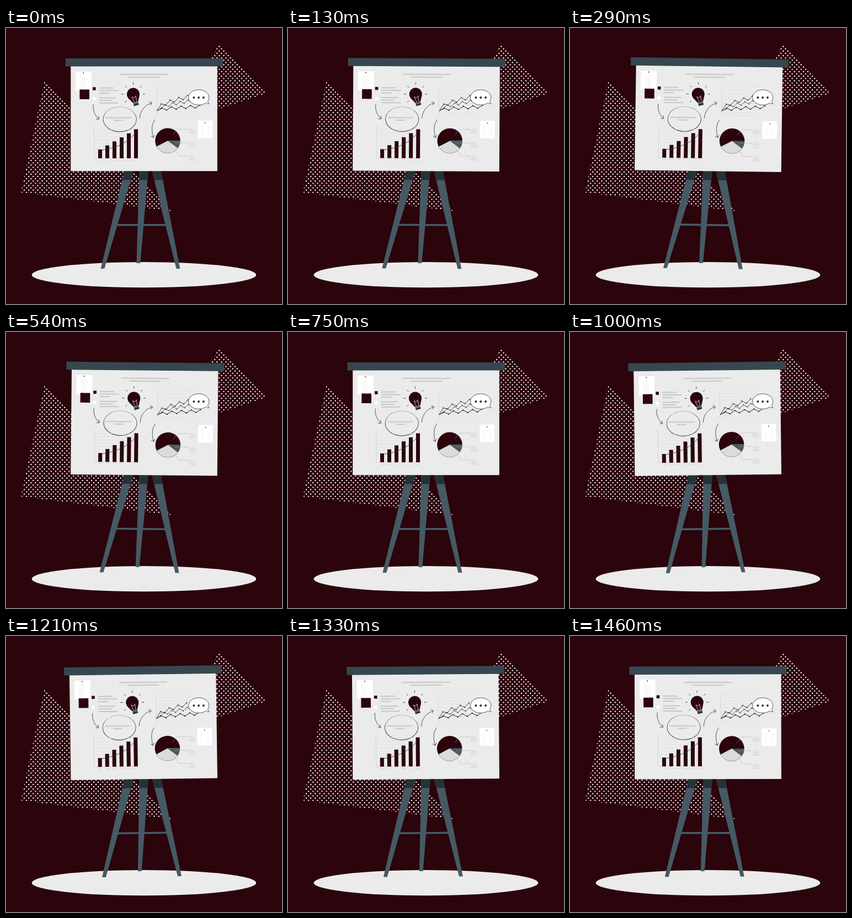
Recreate the animation shown at these times as an HTML page with a canvas. Size 500x500 px, loop 1.5 s.

```html
<!DOCTYPE html>
<html lang="en">
<head>
<meta charset="utf-8">
<title>Swaying presentation board</title>
<style>
  html, body { margin: 0; width: 100%; height: 100%; overflow: hidden; background: #2b040c; }
  canvas { display: block; width: 500px; height: 500px; }
</style>
</head>
<body>
<canvas id="stage"></canvas>
<script>
const WINE = '#2b040c', INK = '#263238', BAR = '#37474f', SLATE = '#455a64';
const PAPER = '#ebebeb', GREY = '#c7c7c7', FAINT = '#dbdbdb', WHITE = '#fff';
const TAU = Math.PI * 2, LOOP = 1500, STEPS = 36;

const canvas = document.getElementById('stage');
const ctx = canvas.getContext('2d');
const ratio = window.devicePixelRatio || 1;
canvas.width = canvas.height = 500 * ratio;

function rect(color, x, y, w, h) {
  ctx.fillStyle = color;
  ctx.fillRect(x, y, w, h);
}

function fill(color, rule = 'nonzero') {
  ctx.fillStyle = color;
  ctx.fill(rule);
}

function stroke(color, width) {
  ctx.strokeStyle = color;
  ctx.lineWidth = width;
  ctx.stroke();
}

function trace(points) {
  ctx.beginPath();
  points.forEach(([x, y]) => ctx.lineTo(x, y));
}

function poly(color, points) {
  trace(points);
  fill(color);
}

function line(color, width, points) {
  trace(points);
  stroke(color, width);
}

function ellipse(color, x, y, rx, ry = rx) {
  ctx.beginPath();
  ctx.ellipse(x, y, rx, ry, 0, 0, TAU);
  fill(color);
}

function curve(start, c1, c2, end) {
  ctx.beginPath();
  ctx.moveTo(...start);
  ctx.bezierCurveTo(...c1, ...c2, ...end);
  stroke(INK, 0.8);
}

function arrow(start, c1, c2, end) {
  curve(start, c1, c2, end);
  const [x, y] = end, back = Math.atan2(c2[1] - y, c2[0] - x);
  const barb = a => [x + 5.3 * Math.cos(back + a), y + 5.3 * Math.sin(back + a)];
  line(INK, 0.8, [barb(-0.72), end, barb(0.72)]);
}

function textLines(color, x, y, gap, height, widths) {
  widths.forEach((w, i) => rect(color, x, y + i * gap, w, height));
}

function centredLines(x, y, gap, widths) {
  widths.forEach((w, i) => rect(GREY, x - w / 2, y + i * gap, w, 2));
}

// One staggered lattice of dots shows through both triangles.
function dotField(corners) {
  const dx = 4.06, dy = 4.13;
  ctx.save();
  trace(corners);
  ctx.clip();
  ctx.beginPath();
  for (let row = 0; row < 75; row++) {
    for (let col = row % 2; col < 114; col += 2) {
      const x = 16.9 + col * dx, y = 29.4 + row * dy;
      ctx.moveTo(x + 1.2, y);
      ctx.arc(x, y, 1.2, 0, TAU);
    }
  }
  fill(WHITE);
  ctx.restore();
}

function backdrop() {
  rect(WINE, 0, 0, 500, 500);
  dotField([[70, 94], [27, 298], [303, 332]]);
  dotField([[386, 28], [473, 118], [314, 170]]);
  ellipse(PAPER, 250, 447.2, 203.2, 23.1);
}

function leg(topX, footX, footY) {
  const topY = 259, shade = 16.5 / (footY - topY);
  const part = (color, t) => {
    const x = topX + (footX - topX) * t, y = topY + (footY - topY) * t;
    poly(color, [[topX, topY], [topX + 16.4, topY], [x + 16.4 - 9.6 * t, y], [x, y]]);
  };
  part(SLATE, 1);
  part(INK, shade);
}

function easel() {
  rect(SLATE, 201, 355, 90, 3.6);
  leg(214.5, 171.5, 436);
  leg(241.3, 236.5, 426);
  leg(264.5, 308.5, 436);
  rect(PAPER, 117.3, 69, 265.5, 190.2);
  rect(BAR, 107.6, 55, 285.4, 14.6);
}

function notes() {
  rect(WHITE, 126, 79, 29, 34.5);
  ellipse(INK, 140.3, 81.3, 1);
  textLines('#e8e8e8', 134, 87, 2.8, 0.7, Array.from({ length: 8 }, (_, i) => 9 + i % 3 * 2));
  rect(WINE, 133.4, 111.4, 17.6, 17.6);
  ellipse(SLATE, 142.3, 113, 0.7);

  rect(WHITE, 347.4, 167.6, 26.8, 31.8);
  ellipse(INK, 360.8, 171.8, 0.9);
  for (const x of [352, 364]) textLines('#eee', x, 177, 3, 0.7, Array(6).fill(6));
}

function captions() {
  centredLines(250.5, 83, 5, [87, 57]);
  centredLines(203.5, 161.6, 4.7, [47, 17]);
  textLines(GREY, 168.7, 107.6, 4.65, 2, [26, 35, 19]);
  textLines(GREY, 168.7, 125.5, 4.65, 2, [31, 24, 35]);
  rect(WINE, 157, 107.2, 5.6, 5.6);
  rect(WHITE, 157, 125.5, 5.6, 5.6);
}

function bulb() {
  ctx.save();
  ctx.translate(230.5, 120);
  for (let i = 0; i < 6; i++) {
    const a = (i - 5) * Math.PI / 4, c = Math.cos(a), s = Math.sin(a);
    line(INK, 0.9, [[17.3 * c, 17.3 * s], [21.3 * c, 21.3 * s]]);
  }
  ctx.rotate(-0.28);
  ellipse(WINE, 0, 0, 11.5);
  poly(WINE, [[-10, 5.5], [10, 5.5], [5, 15], [-5, 15]]);
  line(PAPER, 0.7, [[-2, 15], [-3.6, 4], [0, 7], [3.6, 4], [2, 15]]);
  rect(INK, -4.6, 15.5, 9.2, 5.6);
  rect(PAPER, -4.6, 17, 9.2, 0.5);
  ctx.restore();
}

function ovalAndArrows() {
  // Offset inner edge makes the outline thin at the top.
  ctx.beginPath();
  ctx.ellipse(206.2, 165.6, 30.5, 22.8, 0, 0, TAU);
  ctx.ellipse(206.2, 165.3, 29.7, 22.2, 0, 0, TAU);
  fill(INK, 'evenodd');
  arrow([158.3, 138.5], [157, 149], [161, 159], [168.5, 165]);
  arrow([242.3, 164], [242.5, 150], [252, 139], [264.5, 135.5]);
  arrow([270, 166], [262.5, 175], [264, 188], [267, 198.5]);
}

function grid(x, y, w, gap, count) {
  for (let i = 0; i < count; i++) rect(FAINT, x, y + i * gap, w, 0.5);
}

function barChart() {
  grid(160, 184, 79, 6, 8);
  line(GREY, 0.6, [[159.8, 177], [159.8, 236], [240, 236]]);
  for (let i = 0; i < 6; i++) {
    const x = 167 + i * 13, height = 16 + i * 7.3;
    rect(WINE, x, 236 - height, 7, height);
    rect(GREY, x, 239, 7, 0.6);
  }
  curve([172, 221.5], [198, 218], [222, 208], [236, 188]);
}

// Zigzag around a square-root trend; the sign of swing sets the first turn.
function series(color, count, step, rise, swing) {
  const points = Array.from({ length: count + 1 }, (_, i) => [
    273.5 + i * step,
    150 - rise * Math.sqrt(i / count) + (i && (i % 2 ? -swing : swing))
  ]);
  line(color, 0.9, points);
  points.slice(1).forEach(([x, y]) => ellipse(color, x, y, 1.1));
}

function lineChart() {
  grid(273, 106, 71, 5.8, 10);
  rect(GREY, 272.8, 106, 0.5, 52.5);
  series(SLATE, 9, 7, 18, -2.5);
  series(WINE, 9, 8.7, 8, 2.5);
  series(INK, 7, 7.9, 25, 3);
}

function slice(color, from, to) {
  ctx.beginPath();
  ctx.moveTo(293, 204.2);
  ctx.arc(293, 204.2, 22.8, from, to);
  fill(color);
}

function leader(x, y, bendX, endY) {
  line('#aaa', 0.5, [[x, y], [bendX, endY], [327, endY]]);
  ellipse('#999', 327, endY, 0.8);
  textLines(GREY, 331, endY - 0.4, 2.6, 0.7, [9, 13, 11, 13]);
}

function pieChart() {
  slice(FAINT, 0.64, 2.66);
  slice(WINE, 2.66, TAU);
  slice(SLATE, 0, 0.64);
  ctx.beginPath();
  ctx.arc(293, 204.2, 22.6, 0.64, 2.66);
  stroke(SLATE, 0.5);
  leader(302, 194, 311, 183.2);
  leader(305, 208, 311, 208);
  leader(306, 220, 312.5, 231.7);
}

function bubble() {
  ctx.beginPath();
  ctx.ellipse(349.2, 125.7, 18.7, 13.8, 0, 0.8, 0.5 + TAU);
  ctx.quadraticCurveTo(366, 136, 368.3, 137.3);
  ctx.quadraticCurveTo(365, 138, 362.2, 135.6);
  ctx.closePath();
  fill(WHITE);
  stroke(INK, 0.8);
  for (let i = -1; i <= 1; i++) ellipse(INK, 349.1 + i * 8.8, 126, 2);
}

// Linear swing: 0 to 1 degree, to -1 degree, back to 0.
function swing(p) {
  if (p < 0.25) return p * 4;
  return p < 0.75 ? 2 - p * 4 : p * 4 - 4;
}

function draw(time) {
  const step = Math.floor((time % LOOP + 5) * STEPS / LOOP) % STEPS;
  ctx.setTransform(ratio, 0, 0, ratio, 0, 0);
  backdrop();
  ctx.save();
  ctx.translate(250.2, 245.5);
  ctx.rotate(swing(step / STEPS) * Math.PI / 180);
  ctx.translate(-250.2, -245.5);
  [easel, notes, captions, bulb, ovalAndArrows, barChart, lineChart, pieChart].forEach(part => part());
  ctx.restore();
  bubble();
}

let start;
function tick(now) {
  start ??= now;
  draw(now - start);
  requestAnimationFrame(tick);
}
draw(0);
requestAnimationFrame(tick);
</script>
</body>
</html>
```
